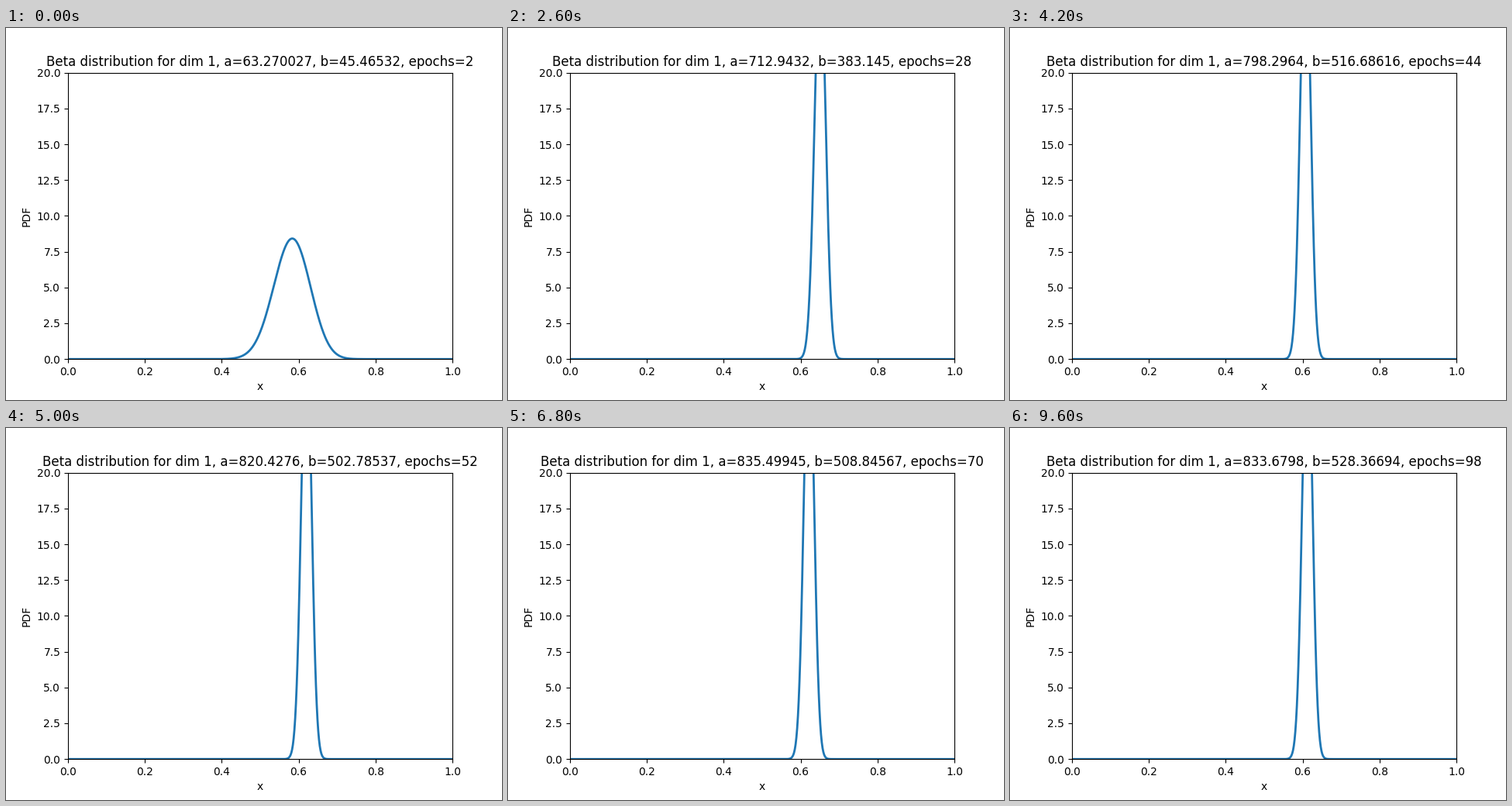
Animation of 640 by 480 pixels, one loop 9.8 s. Source, as a matplotlib script:

```python
import math

import numpy as np
import matplotlib.pyplot as plt
from matplotlib.animation import FuncAnimation

FRAMES = 49
INTERVAL = 200
SETTLE = 30  # epochs over which the fit slows down

# Key points of the fit: epoch, a, b.
KEYS = [
    (2, 63.270027, 45.46532),
    (16, 477.9288, 380.6188),
    (28, 712.9432, 383.145),
    (44, 798.2964, 516.68616),
    (60, 837.3785, 492.13837),
    (80, 834.1531, 520.817),
    (98, 833.6798, 528.36694),
]

x = np.linspace(0, 1, 1001)
inner = np.clip(x, 1e-12, 1 - 1e-12)


def progress(epoch):
    """Fast at first, then levelling off."""
    return 1 - math.exp(-epoch / SETTLE)


def fit_at(epoch):
    epochs, *params = zip(*KEYS)
    knots = [progress(e) for e in epochs]
    return [np.float32(np.interp(progress(epoch), knots, p)) for p in params]


def beta_pdf(a, b):
    log_norm = math.lgamma(a + b) - math.lgamma(a) - math.lgamma(b)
    return np.exp(log_norm + (a - 1) * np.log(inner) + (b - 1) * np.log1p(-inner))


fig, ax = plt.subplots(figsize=(6.4, 4.8), dpi=100)
line, = ax.plot([], [], color="#1f77b4", lw=2)
ax.set(xlim=(0, 1), ylim=(0, 20), xlabel="x", ylabel="PDF")
title = ax.set_title("")


def update(i):
    epoch = 2 * (i + 1)
    a, b = fit_at(epoch)
    line.set_data(x, beta_pdf(float(a), float(b)))
    title.set_text(f"Beta distribution for dim 1, a={str(a)}, b={str(b)}, epochs={epoch}")
    return line, title


anim = FuncAnimation(fig, update, frames=FRAMES, interval=INTERVAL,
                     init_func=lambda: update(0), repeat=True, repeat_delay=0)
plt.show()
```
